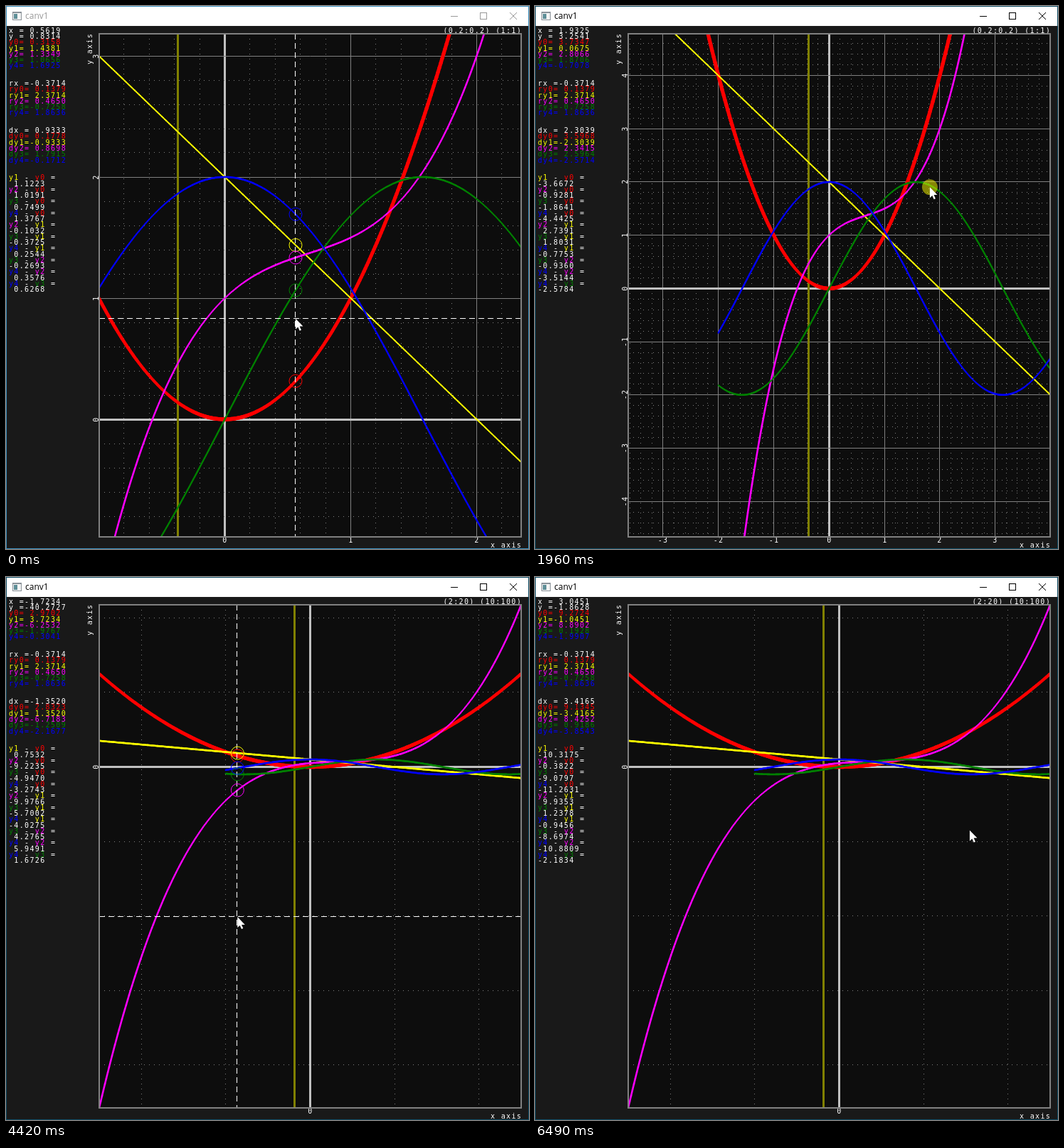
Animation, 735 px wide and 762 px high, one loop 7390 ms. Source, as an HTML page with a canvas:

```html
<!DOCTYPE html>
<html lang="en">
<head>
<meta charset="utf-8">
<title>canv1</title>
<style>
  html, body { margin: 0; width: 100%; height: 100%; overflow: hidden; background: #191919; }
  canvas { display: block; }
</style>
</head>
<body>
<canvas id="stage" width="735" height="762"></canvas>
<script>
const ctx = document.getElementById('stage').getContext('2d');
const LOOP = 7390, TICK = 10;
const L = 131, R = 724, T = 39, B = 745;
const X_RANGE = [-5, 5], Y_RANGE = [-91.5, 43.5];
const REF_X = -0.3714;
const ADVANCE = 7.37, ROW = 8.26;
const GRAY = '#808080', SILVER = '#c0c0c0';

const curves = [
  { f: x => x * x, color: '#f00', width: 5.4, from: -5 },
  { f: x => 2 - x, color: '#ff0', width: 2.6, from: -5 },
  { f: x => 1 + x - x * x + x ** 3 / 2, color: '#f0f', width: 2.6, from: -5 },
  { f: x => 2 * Math.sin(x), color: '#008000', width: 2.6, from: -2 },
  { f: x => 2 * Math.cos(x), color: '#00f', width: 2.6, from: -2 },
];
const valueAt = (c, x) => x < c.from || x > 5 ? NaN : c.f(x);

// Pointer path: time, x, y
const path = [
  [0, 406.96, 438.66], [150, 412, 432], [580, 412, 432], [740, 419.8, 296.6], [760, 419.8, 296.6],
  [940, 402, 465], [1080, 396, 560.3], [1100, 396, 560.3], [1340, 523.3, 264.6], [1360, 523.3, 264.6],
  [1550, 488, 415], [1680, 470, 512.2], [1700, 470, 512.2], [1880, 563.6, 153.3], [1900, 563.6, 153.3],
  [2200, 520, 657.7], [2210, 520, 657.7], [2340, 498.4, 421], [2450, 470, 400], [2500, 470, 400],
  [3100, 345, 470], [3210, 323, 480], [4370, 323, 480], [4420, 325.3, 477.1], [5000, 285.9, 208.2],
  [5080, 285.9, 208.2], [5520, 684, 360], [5650, 684, 360], [5850, 650, 355.4], [6030, 610.9, 355.4],
  [LOOP, 610.9, 355.4],
];

function pointer(t) {
  const i = Math.max(1, path.findIndex(p => p[0] >= t));
  const [t0, x0, y0] = path[i - 1], [t1, x1, y1] = path[i];
  const k = (t - t0) / (t1 - t0);
  return { x: x0 + (x1 - x0) * k, y: y0 + (y1 - y0) * k };
}

// A view holds the pixel position of the origin and the pixels per unit.
const startView = { x: 307.5, y: 580, sx: 177, sy: 170 };
const fit = (x0, x1, y0, y1) => {
  const sx = (R - L) / (x1 - x0), sy = (B - T) / (y1 - y0);
  return { x: L - x0 * sx, y: T + y1 * sy, sx, sy };
};
const toWorld = (v, p) => ({ x: (p.x - v.x) / v.sx, y: (v.y - p.y) / v.sy });

const actions = {
  zoom(v, a, b) {
    const k = 1 - (b.y - a.y) * 0.001153;
    return { x: a.x + k * (v.x - a.x), y: a.y + k * (v.y - a.y), sx: v.sx * k, sy: v.sy * k };
  },
  pan: (v, a, b) => ({ ...v, x: v.x + b.x - a.x, y: v.y + b.y - a.y }),
  reset: () => fit(...X_RANGE, ...Y_RANGE),
  select(v, a, b, held) {
    if (held) return v;
    const p = toWorld(v, a), q = toWorld(v, b);
    return fit(p.x, q.x, q.y, p.y);
  },
};
const gestures = [
  ['zoom', 760, 1090], ['zoom', 1360, 1690], ['zoom', 1900, 2205], ['pan', 2500, 3100],
  ['reset', 3390, 3440], ['select', 5080, 5650], ['reset', 6490, LOOP],
];

function stateAt(t) {
  const mouse = pointer(t);
  let view = startView, info = null, held = null, press = null;
  for (const [kind, from, to] of gestures) {
    if (t < from) break;
    const a = pointer(from);
    if (t < to) {
      held = kind;
      press = a;
      info = toWorld(view, a);
    }
    view = actions[kind](view, a, pointer(Math.min(t, to)), t < to);
  }
  return { mouse, view, held, press, info: info || toWorld(view, mouse), active: t >= 760 };
}

function line(x0, y0, x1, y1, color, width = 1, dash = []) {
  ctx.strokeStyle = color;
  ctx.lineWidth = width;
  ctx.setLineDash(dash);
  ctx.beginPath();
  ctx.moveTo(x0, y0);
  ctx.lineTo(x1, y1);
  ctx.stroke();
  ctx.setLineDash([]);
}

function disc(x, y, r, color, filled) {
  ctx.beginPath();
  ctx.arc(x, y, r, 0, 7);
  ctx.fillStyle = ctx.strokeStyle = color;
  ctx.lineWidth = 1;
  filled ? ctx.fill() : ctx.stroke();
}

function text(s, x, y, color = '#fff') {
  ctx.font = '10px "DejaVu Sans Mono", monospace';
  ctx.letterSpacing = '1.35px';
  ctx.fillStyle = color;
  ctx.fillText(s, x, y);
}

function upText(s, x, y) {
  ctx.save();
  ctx.translate(x, y);
  ctx.rotate(-Math.PI / 2);
  text(s, 0, 0);
  ctx.restore();
}

function drawWindow(active) {
  const ink = active ? '#000' : '#999';
  ctx.fillStyle = '#191919';
  ctx.fillRect(0, 0, 735, 762);
  ctx.fillStyle = '#fff';
  ctx.fillRect(0, 0, 735, 28);
  ctx.fillStyle = '#8a9299';
  ctx.fillRect(9, 8, 13, 12);
  ctx.fillStyle = '#f4f4f4';
  ctx.fillRect(10, 10, 11, 9);
  ctx.fillStyle = '#5f8f98';
  ctx.fillRect(11, 11, 5, 7);
  ctx.font = '12px "Open Sans", sans-serif';
  ctx.letterSpacing = '0px';
  ctx.fillStyle = ink;
  ctx.fillText('canv1', 27, 18);
  line(625, 14.5, 635, 14.5, ink);
  ctx.strokeRect(666.5, 9.5, 9, 9);
  line(708, 9, 718, 19, ink);
  line(718, 9, 708, 19, ink);
  ctx.strokeStyle = active ? '#0f4c64' : '#3b8fbe';
  ctx.strokeRect(0.5, 0.5, 734, 761);
}

function drawGrid(v, X, Y) {
  const majorStep = span => 10 ** Math.floor(Math.log10(span) + 1e-9);
  const mx = majorStep((R - L) / v.sx), my = majorStep((B - T) / v.sy);
  const left = Math.max(L, X(X_RANGE[0])), right = Math.min(R, X(X_RANGE[1]));
  const top = Math.max(T, Y(Y_RANGE[1])), bottom = Math.min(B, Y(Y_RANGE[0]));
  const styles = [[GRAY, 1, [1, 6]], [GRAY, 1], [SILVER, 3]];

  function ticks(lo, hi, major, draw) {
    for (let rank = 0; rank < 3; rank++) {
      for (let i = Math.ceil(lo / major * 5 - 1e-6); i <= hi / major * 5 + 1e-6; i++) {
        const r = i === 0 ? 2 : i % 5 === 0 ? 1 : 0;
        if (r === rank) draw(i * major / 5, styles[r], r > 0 && String(+(i / 5 * major).toFixed(4)));
      }
    }
  }
  const a = toWorld(v, { x: left, y: bottom }), b = toWorld(v, { x: right, y: top });
  ticks(a.x, b.x, mx, (n, style, label) => {
    const x = Math.floor(X(n)) + 0.5;
    line(x, top, x, bottom, ...style);
    if (label) text(label, x - label.length * ADVANCE / 2 + 0.5, 753);
  });
  ticks(a.y, b.y, my, (n, style, label) => {
    const y = Math.floor(Y(n)) + 0.5;
    line(left, y, right, y, ...style);
    if (label) upText(label, 130, y + label.length * ADVANCE / 2 - 0.5);
  });
  const steps = `(${mx / 5}:${my / 5}) (${mx}:${my})`;
  text(steps, 725 - steps.length * ADVANCE, 38);
  text('x axis', 681, 760);
  upText('y axis', 121, 82);
}

// Thickness is measured along the pixel grid, so slanted parts look thinner.
function drawCurves(X, Y, v) {
  ctx.lineCap = 'round';
  for (const c of curves) {
    const end = Math.min(R, X(5));
    const yAt = x => Y(c.f((x - v.x) / v.sx));
    for (let x = Math.max(L, X(c.from)); x < end; x += 2) {
      const x1 = Math.min(x + 2, end), y0 = yAt(x), y1 = yAt(x1);
      const dx = x1 - x, dy = Math.abs(y1 - y0);
      line(x, y0, x1, y1, c.color, c.width * Math.max(dx, dy) / Math.hypot(dx, dy));
    }
  }
  ctx.lineCap = 'butt';
}

function drawReadout({ x, y }) {
  const num = n => isNaN(n) ? ' nan' : (n < 0 ? '' : ' ') + n.toFixed(4);
  const at = (s, row, color, col = 0) => text(s, 4 + col * ADVANCE, 37.8 + row * ROW, color);
  const now = curves.map(c => valueAt(c, x));
  const ref = curves.map(c => c.f(REF_X));
  const block = (row, prefix, values) =>
    values.forEach((n, i) => at(`${prefix}${i}=${num(n)}`, row + i, curves[i].color));

  at('x =' + num(x), 0);
  at('y =' + num(y), 1);
  block(2, 'y', now);
  at('rx =' + num(REF_X), 9);
  block(10, 'ry', ref);
  at('dx =' + num(x - REF_X), 17);
  block(18, 'dy', now.map((n, i) => n - ref[i]));

  let row = 25;
  for (let j = 0; j < 4; j++) {
    for (let i = j + 1; i < 5; i++) {
      at('y' + i, row, curves[i].color);
      at('-', row, '#fff', 3);
      at('y' + j, row, curves[j].color, 5);
      at('=', row, '#fff', 8);
      at(num(now[i] - now[j]), row + 1);
      row += 2;
    }
  }
}

function drawCrosshair({ x, y }, Y, info) {
  const px = Math.round(x) - 0.5, py = Math.round(y) - 0.5;
  line(L, py, R, py, '#fff', 1, [8, 5]);
  line(px, T, px, B, '#fff', 1, [8, 5]);
  for (const c of curves) {
    const value = valueAt(c, info.x);
    if (!isNaN(value)) disc(x, Y(value), 9, c.color);
  }
}

function drawPointer({ x, y }, pressed) {
  if (pressed) disc(x, y, 11, 'rgba(255,255,0,.5)', true);
  const arrow = [[0, 0], [0, 15], [3.4, 11.8], [5.7, 17], [8, 16], [5.7, 10.8], [10.5, 10.8]];
  ctx.beginPath();
  for (const [dx, dy] of arrow) ctx.lineTo(x + dx, y + dy);
  ctx.closePath();
  ctx.fillStyle = '#fff';
  ctx.fill();
}

function draw(t) {
  const { mouse, view, held, press, info, active } = stateAt(t);
  const X = x => view.x + x * view.sx, Y = y => view.y - y * view.sy;

  drawWindow(active);
  ctx.fillStyle = '#0d0d0d';
  ctx.fillRect(L, T, R - L, B - T);
  drawGrid(view, X, Y);

  ctx.save();
  ctx.beginPath();
  ctx.rect(L, T, R - L, B - T);
  ctx.clip();
  const refX = Math.floor(X(REF_X)) + 0.5;
  line(refX, T, refX, B, '#808000', 3);
  drawCurves(X, Y, view);
  if (!held) drawCrosshair(mouse, Y, info);
  if (held === 'select') {
    const box = [press.x, press.y, mouse.x - press.x, mouse.y - press.y];
    ctx.fillStyle = 'rgba(0,128,128,.2)';
    ctx.fillRect(...box);
    ctx.strokeStyle = '#008080';
    ctx.lineWidth = 2;
    ctx.strokeRect(...box);
  }
  ctx.restore();

  ctx.strokeStyle = GRAY;
  ctx.lineWidth = 2;
  ctx.strokeRect(L, T, R - L, B - T);
  drawReadout(info);
  drawPointer(mouse, held && held !== 'reset');
}

const started = performance.now();
function frame() {
  const t = (performance.now() - started) % LOOP;
  draw(Math.floor(t / TICK) * TICK);
  requestAnimationFrame(frame);
}
frame();
</script>
</body>
</html>
```
